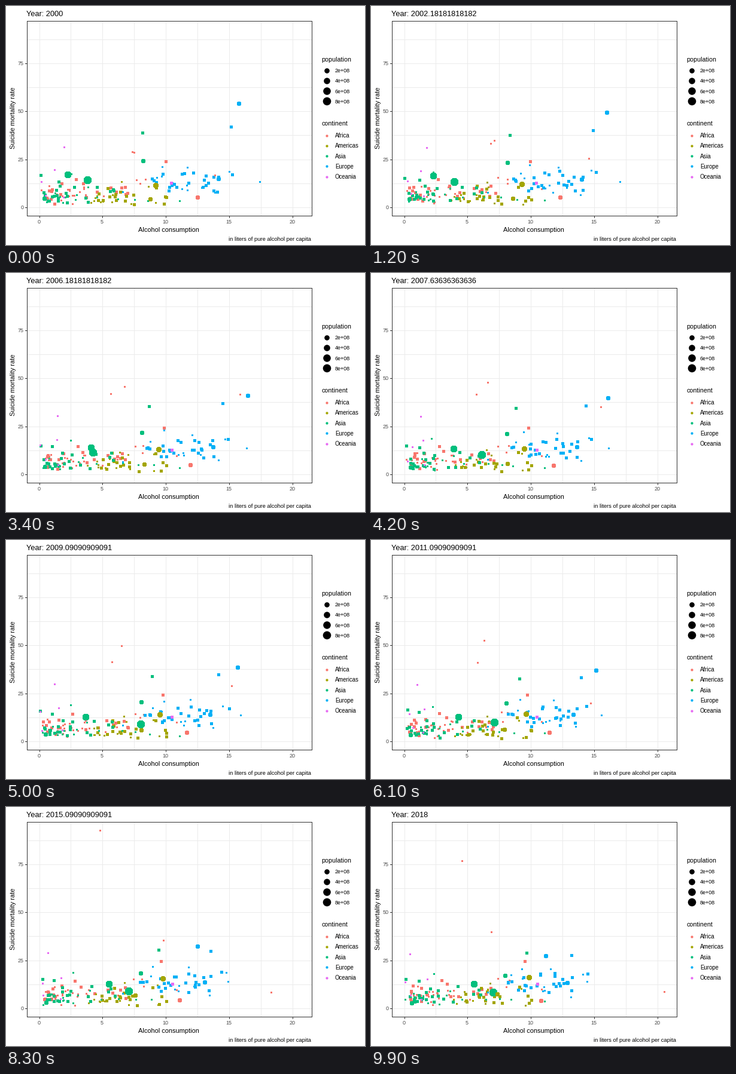
These frames come from a looping animation (600x400 px, 10 s). A matplotlib script:

```python
import numpy as np
import matplotlib.pyplot as plt
from matplotlib.animation import FuncAnimation
from matplotlib.patches import Rectangle

W, H, FRAMES, INTERVAL, DPI = 600, 400, 100, 100, 100
PT = 72 / DPI
plt.rcParams["font.family"] = "Liberation Sans"
rng = np.random.default_rng(2000)

COLORS = {"Africa": "#F8766D", "Americas": "#A3A500", "Asia": "#00BF7D",
          "Europe": "#00B0F6", "Oceania": "#E76BF3"}
LEFT, RIGHT, TOP, BOTTOM = 34.5, 510.5, 24.5, 350.5
GRID, DARK, GREY = "#EBEBEB", "#333333", "#4D4D4D"


def px(v):
    return 55 + 21.15 * v


def py(v):
    return 336.5 - 3.215 * v


paths, radii, colors = [], [], []


def add(name, r, keys, xs, ys):
    """Add one country that moves linearly between its waypoints."""
    t = np.arange(FRAMES)
    paths.append([np.interp(t, keys, xs), np.interp(t, keys, ys)])
    radii.append(r)
    colors.append(COLORS[name])


def cloud(name, x0, log_rate, spread, drift, limits, share):
    """Small countries that wander from year to year."""
    years = np.linspace(0, 1, 19)
    for x in x0:
        rate = np.exp(rng.normal(log_rate, spread))
        xs = x + drift * years + rng.normal(0, 4, years.size)
        ys = py(rate) + rng.normal(0, 2, years.size)
        add(name, 2 if rng.random() < share else 1, years * (FRAMES - 1),
            np.clip(xs, *limits), np.clip(ys, 225, 332))


cloud("Africa", 55 + rng.gamma(1.6, 42, 45), 1.98, .42, 0, (56, 285), .45)
cloud("Americas", rng.normal(195, 38, 30), 1.75, .5, 6, (120, 268), .5)
cloud("Asia", 55 + rng.gamma(1.3, 42, 37), 1.65, .45, 0, (55, 290), .6)
cloud("Europe", rng.normal(295, 45, 34), 2.55, .36, -14, (195, 380), .65)
cloud("Oceania", rng.uniform(62, 105, 3), 1.8, .4, 0, (56, 120), 0)

# Countries with a turning path
KEYS = (0, 34, 61, 83, 99)
add("Africa", 1, KEYS, (211, 198, 189, 157, 152), (244, 190, 168, 39, 90))
add("Africa", 1, KEYS, (214, 175, 178, 263, 201), (245, 202, 205, 223, 209))
add("Africa", 1, KEYS, (349, 391, 367, 443, 490), (283, 203, 273, 310, 309))
add("Asia", 6, (0, 34, 50, 61, 99), (136, 145, 225, 206, 204), (291, 300, 308, 305, 310))
add("Asia", 5, (0, 23, 34, 50, 83), (103, 104, 142, 133, 172), (282, 285, 292, 296, 296))
add("Europe", 3, KEYS, (389, 404, 376, 320, 292), (163, 205, 218, 233, 249))

# Countries that drift steadily: radius, start, end
DRIFTS = [
    ("Africa", 2, (267, 260), (257, 258)),
    ("Africa", 3, (320, 320), (284, 324)),
    ("Americas", 4, (250, 300), (264, 285)),
    ("Americas", 3, (241, 323), (211, 313)),
    ("Asia", 3, (229, 259), (224, 282)),
    ("Asia", 2, (228, 212), (260, 244)),
    ("Asia", 3, (64, 322), (68, 328)),
    ("Europe", 2, (376, 202), (335, 248)),
    ("Europe", 3, (355, 289), (328, 294)),
    ("Europe", 2, (347, 309), (297, 310)),
    ("Europe", 1, (424, 294), (361, 292)),
    ("Oceania", 1, (97, 236), (65, 246)),
    ("Oceania", 2, (276, 296), (278, 296)),
    ("Oceania", 1, (81, 274), (94, 288)),
]
for name, r, start, end in DRIFTS:
    add(name, r, (0, FRAMES - 1), *zip(start, end))

paths = np.round(paths) + 0.5
radii = np.array(radii)

fig = plt.figure(figsize=(W / DPI, H / DPI), dpi=DPI, facecolor="white")
ax = fig.add_axes([0, 0, 1, 1])
ax.set(xlim=(0, W), ylim=(H, 0))
ax.axis("off")


def label(x, y, s, size, color="black", **kw):
    return ax.text(x, y, s, fontsize=size * PT, color=color, **kw)


def line(xs, ys, color):
    ax.plot(xs, ys, color=color, lw=PT, antialiased=False,
            solid_capstyle="butt", zorder=1)


def dots(x, y, r, c):
    size = (2 * (np.asarray(r) + 0.3) * PT) ** 2
    return ax.scatter(x, y, s=size, c=c, linewidths=0, antialiased=False, zorder=3)


for v in np.arange(0, 20.1, 2.5):
    x = int(px(v)) + 0.5
    line([x, x], [TOP, BOTTOM], GRID)
    if v % 5 == 0:
        line([x, x], [BOTTOM, BOTTOM + 3], DARK)
        label(x, 364, f"{v:.0f}", 9, GREY, ha="center")
for v in np.arange(0, 90, 12.5):
    y = int(py(v)) + 0.5
    line([LEFT, RIGHT], [y, y], GRID)
    if v % 25 == 0:
        line([LEFT - 3, LEFT], [y, y], DARK)
        label(29.5, y + 3.5, f"{v:.0f}", 9, GREY, ha="right")

ax.add_patch(Rectangle((LEFT, TOP), RIGHT - LEFT, BOTTOM - TOP, fill=False,
                       ec=DARK, lw=PT, antialiased=False, zorder=4))
label(272, 378, "Alcohol consumption", 11, ha="center")
label(12, 187.5, "Suicide mortality rate", 11, rotation=90, ha="center", va="center")
label(510, 393, "in liters of pure alcohol per capita", 9.4, ha="right")

label(527, 93, "population", 10.6)
for i, r in enumerate((4, 5, 6, 6.5)):
    y = 107 + 17.28 * i
    dots([535.5], [int(y) + 0.5], [r], "black")
    label(550, y + 4, f"{2 * (i + 1)}e+08", 9)
label(527, 200, "continent", 10.6)
for i, (name, color) in enumerate(COLORS.items()):
    y = 216 + 17.28 * i
    dots([535.5], [int(y) + 0.5], [1.8], color)
    label(550, y + 4, name, 9.6)

title = label(34, 17, "", 12.7)
points = dots(paths[:, 0, 0], paths[:, 1, 0], radii, colors)


def update(i):
    title.set_text(f"Year: {2000 + 18 * i / (FRAMES - 1):.15g}")
    points.set_offsets(paths[:, :, i])
    return title, points


anim = FuncAnimation(fig, update, frames=FRAMES, interval=INTERVAL,
                     repeat=True, repeat_delay=0)
plt.show()
```
